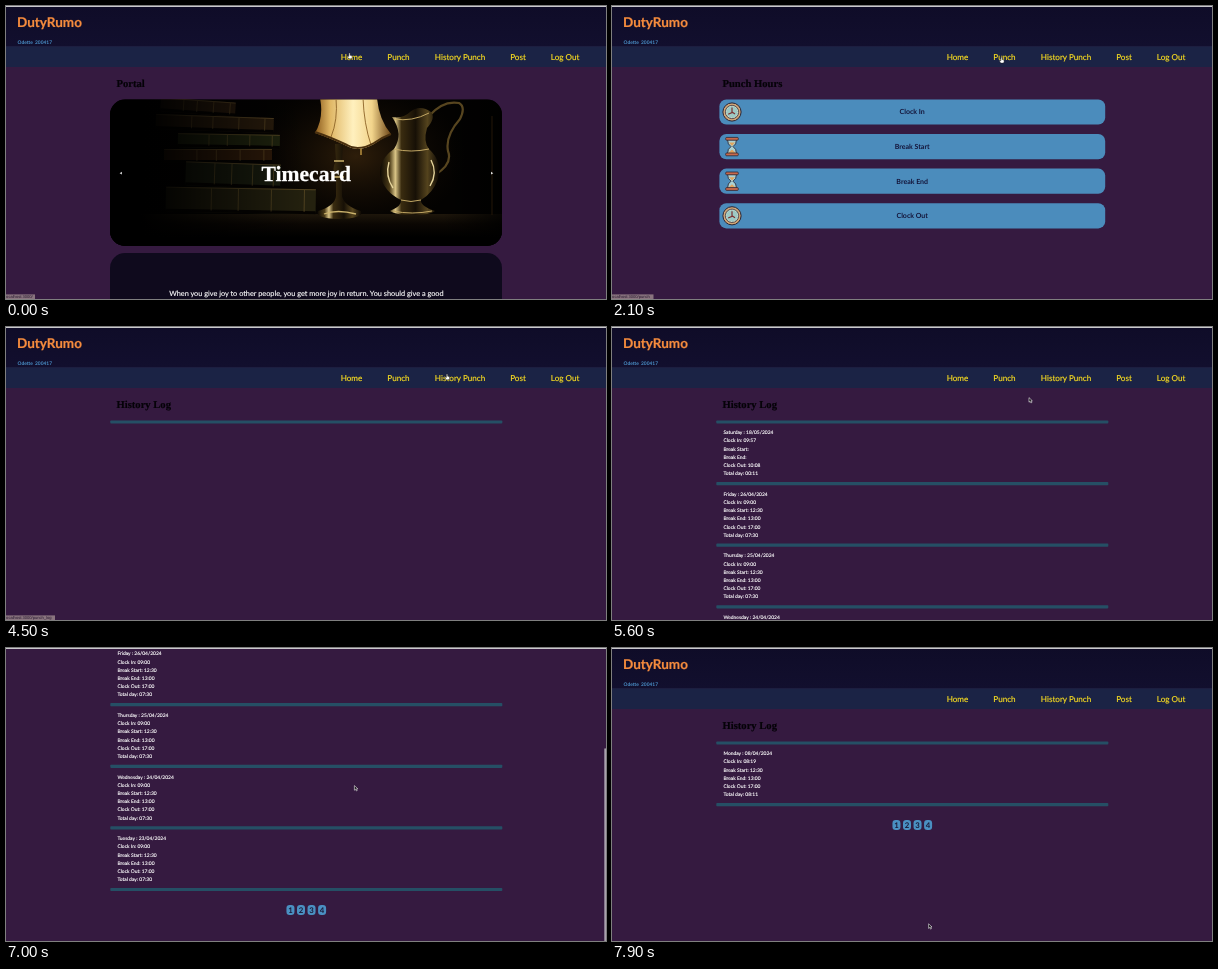
An HTML page for the animation above (8 s loop, 600x293 px).

```html
<!DOCTYPE html>
<html lang="en">
<head>
<meta charset="utf-8">
<title>Timecard portal</title>
<style>
  html, body { margin: 0; width: 100%; height: 100%; overflow: hidden; background: #351a40; }
  svg { display: block; width: 100%; height: 100%; }
  text { font-family: Lato, "Open Sans", sans-serif; text-rendering: geometricPrecision; white-space: pre; }
  .serif { font-family: "Liberation Serif", "Noto Serif", serif; font-weight: 700; }
  .title { font-size: 10.6px; fill: #050308; stroke: #050308; stroke-width: .2px; }
  .nav { font-size: 8.15px; fill: #fbdf20; stroke: #fbdf20; stroke-width: .16px; }
  .bold { font-weight: 700; }
  .row { font-size: 4.95px; fill: #fff; stroke: #fff; stroke-width: .14px; }
  .mid { text-anchor: middle; }
  .link { font-family: "Liberation Sans", sans-serif; font-size: 4.1px; }
</style>
</head>
<body>
<svg viewBox="0 0 600 293" preserveAspectRatio="none">
  <defs>
    <linearGradient id="head" x2="0" y2="1">
      <stop stop-color="#0f0c28"/><stop offset="1" stop-color="#120f2e"/>
    </linearGradient>
    <linearGradient id="shade">
      <stop stop-color="#8a5a1c"/><stop offset=".2" stop-color="#e0b765"/>
      <stop offset=".5" stop-color="#fff0be"/><stop offset=".75" stop-color="#f2d48b"/>
      <stop offset="1" stop-color="#6b4415"/>
    </linearGradient>
    <linearGradient id="metal">
      <stop stop-color="#0c0803"/><stop offset=".16" stop-color="#4a3a17"/>
      <stop offset=".26" stop-color="#d9c486"/><stop offset=".36" stop-color="#3a2c10"/>
      <stop offset=".6" stop-color="#171006"/><stop offset=".8" stop-color="#54431d"/>
      <stop offset="1" stop-color="#0a0602"/>
    </linearGradient>
    <linearGradient id="shelf" x2="0" y2="1">
      <stop stop-color="#1e160b"/><stop offset=".3" stop-color="#0b0703"/><stop offset=".7" stop-color="#000"/>
    </linearGradient>
    <radialGradient id="glow">
      <stop stop-color="#4a3010" stop-opacity=".6"/><stop offset="1" stop-color="#1a0f05" stop-opacity="0"/>
    </radialGradient>
    <linearGradient id="dim">
      <stop offset=".08" stop-color="#000"/><stop offset=".3" stop-color="#000" stop-opacity=".5"/>
      <stop offset=".5" stop-color="#000" stop-opacity="0"/><stop offset=".85" stop-color="#000" stop-opacity="0"/>
      <stop offset="1" stop-color="#000" stop-opacity=".8"/>
    </linearGradient>
    <clipPath id="slide"><rect x="104" y="93.5" width="392" height="146.5" rx="15"/></clipPath>
  </defs>
  <rect width="600" height="293" fill="#351a40"/>
  <g id="doc">
    <rect width="600" height="40.5" fill="url(#head)"/>
    <rect y="40.3" width="600" height="20.7" fill="#1b2345"/>
    <text class="bold" x="11" y="21.2" font-size="13.5" fill="#f68c3e" stroke="#f68c3e" stroke-width=".2">DutyRumo</text>
    <text class="bold" x="11.5" y="38.4" font-size="4.9" fill="#4b93cc">Odette</text>
    <text class="bold" x="29" y="38.4" font-size="4.9" fill="#4b93cc">200417</text>
    <g id="nav"></g>
    <text id="title" class="serif title" x="110.5" y="81.2"></text>

    <g id="home">
      <g clip-path="url(#slide)">
        <rect x="104" y="93" width="392" height="148" fill="#030201"/>
        <ellipse cx="350" cy="150" rx="110" ry="75" fill="url(#glow)"/>
        <rect x="104" y="208" width="392" height="33" fill="url(#shelf)"/>
        <g id="books"></g>
        <rect x="104" y="93" width="392" height="148" fill="url(#dim)"/>
        <path d="M329 138H337L336 155Q341 163 336 171V190Q338 200 355 205Q359 212 333 213Q308 212 312 205Q329 200 330 190V171Q325 163 330 155Z" fill="url(#metal)"/>
        <path d="M318 208Q331 203 350 208M328 171H338M328 155H338" fill="none" stroke="#cdb46d" stroke-width="1.3"/>
        <path d="M355 138V149" stroke="#b08a3c" stroke-width="1.6"/>
        <path d="M314 92H371Q373 114 385 128Q377 132 368 138Q352 147 341 140Q324 132 309 127Q318 112 314 92Z" fill="url(#shade)"/>
        <path d="M330 92Q332 114 325 131M357 92Q358 118 365 139" fill="none" stroke="#8d6427" stroke-width=".9"/>
        <path d="M309 126Q324 131 341 139Q352 146 368 137Q377 131 385 128" fill="none" stroke="#4a300f" stroke-width="2"/>
        <path d="M423 110Q437 94 453 97Q460 101 454 113Q439 130 442 145Q447 158 429 169" fill="none" stroke="#57451f" stroke-width="2.2"/>
        <path d="M386 111Q397 113 404 106Q414 98 425 106Q430 112 421 122Q417 136 423 143Q437 156 432 173Q427 187 415 194Q414 200 429 205Q424 209 407 209Q389 209 384 205Q396 200 395 194Q378 186 374 169Q373 153 388 143Q398 128 386 111Z" fill="url(#metal)"/>
        <path d="M388 113Q406 116 423 107M388 143Q405 147 423 143M395 194Q405 197 415 194M387 205Q406 209 426 205" fill="none" stroke="#c2a764" stroke-width="1"/>
        <path d="M383 156Q379 170 387 182M425 154Q432 167 424 180" fill="none" stroke="#e6d59c" stroke-width="1.4"/>
        <path d="M486 110V209" stroke="#1f1408" stroke-width="1.2"/>
      </g>
      <text class="serif mid" x="300.3" y="174.8" font-size="21.6" fill="#fff" stroke="#fff" stroke-width=".3">Timecard</text>
      <path d="M115.9 165.8L113.6 167.2L115.9 168.6ZM485 165.8L487.3 167.2L485 168.6Z" fill="#ddd"/>
      <rect x="104" y="247" width="392" height="80" rx="15" fill="#0f0a1d"/>
      <text id="quote" class="mid" x="300.4" y="290" font-size="7.34" fill="#fff" stroke="#fff" stroke-width=".15"></text>
    </g>

    <g id="punch"></g>
    <g id="log"></g>
  </g>

  <rect id="bar" x="598.3" width="1.7" rx=".8" fill="#a9a2ad"/>
  <rect width="600" height="1" fill="#c9c8cc"/>
  <g id="status">
    <rect y="288.4" height="4.6" fill="#dccdbd"/>
    <text class="link" x="-.8" y="292.2" fill="#17121a"></text>
  </g>
  <g id="cursor">
    <path id="arrow" d="M0 0V4.6L1.1 3.6L1.9 5.3L2.8 4.9L2 3.2H3.4Z" fill="#111" stroke="#fff" stroke-width=".55"/>
    <path id="hand" d="M-.6 0Q0 -.6 .6 0V2L2.5 2.5Q3 4.6 2 5.6H-.8L-2.2 3.3Q-1.6 2.6 -.6 3.3Z" fill="#fff" stroke="#222" stroke-width=".45"/>
  </g>
</svg>
<script>
const LOOP = 8000, STEP = 100;
const $ = id => document.getElementById(id);
const show = (id, on) => { $(id).style.display = on ? "" : "none"; };

function add(parent, tag, attrs, text) {
  const el = document.createElementNS("http://www.w3.org/2000/svg", tag);
  for (const key in attrs) el.setAttribute(key, attrs[key]);
  if (text) el.textContent = text;
  parent.append(el);
  return el;
}

// Navigation
[["Home", 334.7], ["Punch", 381.3], ["History Punch", 428.8], ["Post", 504.2], ["Log Out", 544.8]]
  .forEach(([name, x]) => add($("nav"), "text", { class: "nav", x, y: 53.8 }, name));

// Stack of books: left, top, width, height, tilt, colour
[[155, 94, 75, 14, 4, "#2a1b0d"], [150, 110, 118, 15, 2, "#2b1d0d"], [172, 128, 102, 14, 1, "#20250f"],
 [158, 143, 108, 14, 0, "#301b0a"], [180, 157, 95, 24, 2, "#191d0f"], [160, 182, 150, 25, 1, "#24210f"]]
  .forEach(([x, y, w, h, tilt, fill]) => {
    const book = add($("books"), "g", { transform: `rotate(${tilt} ${x + w / 2} ${y})` });
    add(book, "rect", { x, y, width: w, height: h, rx: 2, fill });
    add(book, "rect", { x, y: y + h - 3, width: w, height: 3, fill: "#050301" });
    for (const k of [.3, .48, .7, .92])
      add(book, "rect", { x: x + w * k, y: y + 1, width: 1, height: h - 3, fill: "#7a6230", opacity: .5 });
    add(book, "path", { d: `M${x} ${y + .5}h${w}`, stroke: "#69542c", "stroke-width": .7 });
  });

// Punch buttons
function clock(g, x, y) {
  add(g, "circle", { cx: x, cy: y, r: 9.1, fill: "#d2a878", stroke: "#2b2634", "stroke-width": 1 });
  add(g, "circle", { cx: x, cy: y, r: 6.7, fill: "#9dc9c4", stroke: "#47323a", "stroke-width": .8 });
  add(g, "circle", { cx: x, cy: y, r: 5.7, fill: "none", stroke: "#e9e0c5", "stroke-width": .9, "stroke-dasharray": "1 1.98" });
  add(g, "path", { d: `M${x} ${y - 4.6}V${y + .6}L${x - 3.8} ${y + 2.2}M${x} ${y}L${x + 3} ${y + 2}`, fill: "none", stroke: "#7b3030", "stroke-width": 1.2 });
}

function hourglass(g, x, y) {
  add(g, "path", {
    d: `M${x - 4.5} ${y - 7}H${x + 4.5}Q${x + 4.5} ${y - 2} ${x + 1} ${y}Q${x + 4.5} ${y + 2} ${x + 4.5} ${y + 7}H${x - 4.5}Q${x - 4.5} ${y + 2} ${x - 1} ${y}Q${x - 4.5} ${y - 2} ${x - 4.5} ${y - 7}Z`,
    fill: "#a9d2d4", stroke: "#2b2634", "stroke-width": .9 });
  add(g, "path", { d: `M${x - 3} ${y - 4}H${x + 3}L${x} ${y - .6}ZM${x - 3.8} ${y + 6.5}L${x} ${y + 3}L${x + 3.8} ${y + 6.5}Z`, fill: "#e3a45c" });
  for (const dy of [-9.2, 6.4])
    add(g, "rect", { x: x - 6.3, y: y + dy, width: 12.6, height: 2.8, rx: 1, fill: "#c9694a", stroke: "#2b2634", "stroke-width": .8 });
}

["Clock In", "Break Start", "Break End", "Clock Out"].forEach((name, i) => {
  const y = 93.4 + i * 34.6, g = $("punch");
  add(g, "rect", { x: 107.4, y, width: 385.8, height: 25.2, rx: 7, fill: "#4b8cbc" });
  (i % 3 ? hourglass : clock)(g, 120, y + 12.6);
  add(g, "text", { class: "bold mid", x: 300.2, y: y + 15, "font-size": 7, fill: "#14153a" }, name);
});

// History lists
const full = ["09:00", "12:30", "13:00", "17:00", "07:30"];
const pages = {
  empty: [],
  first: [
    ["Saturday : 18/05/2024", "09:57", "", "", "10:08", "00:11"],
    ["Friday : 26/04/2024", ...full], ["Thursday : 25/04/2024", ...full],
    ["Wednesday : 24/04/2024", ...full], ["Tuesday : 23/04/2024", ...full]
  ],
  last: [["Monday : 08/04/2024", "08:19", "12:30", "13:00", "17:00", "08:11"]]
};
const labels = ["", "Clock In: ", "Break Start: ", "Break End: ", "Clock Out: ", "Total day: "];

for (const id in pages) {
  const g = add($("log"), "g", { id });
  const rule = i => add(g, "rect", { x: 104.3, y: 93.4 + i * 61.6, width: 392, height: 3.2, rx: .8, fill: "#254f65" });
  rule(0);
  pages[id].forEach((day, i) => {
    day.forEach((value, j) =>
      add(g, "text", { class: "row", x: 111.4, y: 107.2 + i * 61.6 + j * 8.2 }, labels[j] + value));
    rule(i + 1);
  });
  const count = pages[id].length, y = 115.4 + count * 61.6;
  if (count) for (let n = 1; n <= 4; n++) {
    const x = 273.9 + n * 10.55;
    add(g, "rect", { x: x - 4, y: y - 5, width: 8, height: 10, rx: 3.2, fill: "#4a90c2" });
    add(g, "text", { class: "bold mid", x, y: y + 2.8, "font-size": 7.8, fill: "#1a1838" }, String(n));
  }
}

// Timeline tables; each entry holds from its time on
const views = [[0, "home"], [1800, "punch"], [4300, "empty"], [4900, "first"], [7600, "last"]];
const titles = { home: "Portal", punch: "Punch Hours" };
const quotes = [
  [0, "When you give joy to other people, you get more joy in return. You should give a good"],
  [700, "We cannot solve problems with the kind of thinking we employed when we came up"]
];
const links = [
  [0, "", 29, .5], [800, "", 0, 0], [1000, "punch", 41.5, 1], [1800, "punch", 41.5, .5],
  [2700, "punch_log", 49, 1], [4300, "punch_log", 49, .5], [5400, "", 0, 0]
];
const pointers = [[0, "hand"], [5300, "arrow"], [7300, "hand"], [7600, "arrow"]];
const path = [
  [0, 343.5, 47.2], [700, 343.5, 47.2], [1200, 389.5, 51.5], [2100, 389.5, 51.5], [2900, 438.5, 54],
  [3500, 438.5, 54], [4100, 441, 47.2], [5300, 441, 47.2], [6200, 348.4, 137.6],
  [7000, 348.4, 137.6], [7350, 316.5, 263], [7600, 316.5, 263], [7800, 316.6, 275.8], [8000, 316.6, 275.8]
];
const scroll = [[0, 0], [6600, 0], [6700, 1], [6800, 45], [6900, 125], [7000, 161.5], [8000, 161.5]];

const current = (table, t) => table.findLast(row => row[0] <= t);

function between(table, t, ease = k => k) {
  const i = table.findIndex(row => row[0] > t);
  const a = table[i - 1], b = table[i], k = ease((t - a[0]) / (b[0] - a[0]));
  return a.slice(1).map((v, n) => v + (b[n + 1] - v) * k);
}

function render(t) {
  const view = current(views, t)[1];
  const isLog = view in pages;
  show("home", view === "home");
  show("punch", view === "punch");
  for (const id in pages) show(id, id === view);
  $("title").textContent = isLog ? "History Log" : titles[view];
  $("quote").textContent = current(quotes, t)[1];

  const y = view === "first" ? between(scroll, t)[0] : 0;
  $("doc").setAttribute("transform", `translate(0 ${-y})`);
  show("bar", view === "first" && t >= 6600);
  $("bar").setAttribute("y", 1 + y * .615);
  $("bar").setAttribute("height", 193);

  const [, link, width, opacity] = current(links, t);
  const [box, label] = $("status").children;
  box.setAttribute("width", width);
  label.textContent = "localhost:3000/" + link;
  $("status").setAttribute("opacity", opacity);

  const pointer = current(pointers, t)[1];
  show("arrow", pointer === "arrow");
  show("hand", pointer === "hand");
  $("cursor").setAttribute("transform", `translate(${between(path, t, k => k * k * (3 - 2 * k))})`);
}

const start = performance.now();
function tick() {
  const t = (performance.now() - start) % LOOP;
  render(Math.floor(t / STEP) * STEP);
  requestAnimationFrame(tick);
}
tick();
</script>
</body>
</html>
```
